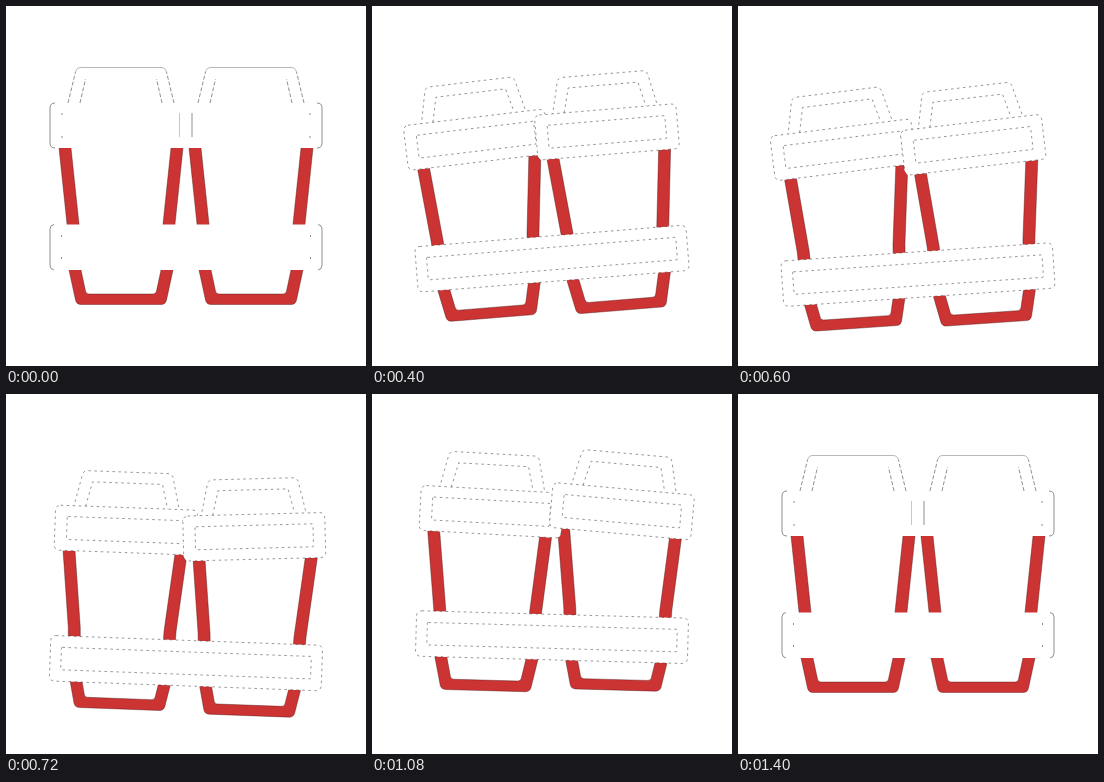
An HTML page that plays this animation: 360x360 px, repeating every 1.64 s.

```html
<!DOCTYPE html>
<html lang="en">
<head>
<meta charset="utf-8">
<title>Two cups in a carrier</title>
<style>
  html, body { margin: 0; width: 100%; height: 100%; overflow: hidden; background: #fff; }
  svg { display: block; width: 100vw; height: 100vh; }
  .white { fill: #fff; }
  .red { fill: #cc3333; fill-rule: evenodd; stroke: #4a1010; stroke-width: .4; }
  .edge { fill: none; stroke: #333; stroke-width: .5; stroke-dasharray: 2.5 3.5; }
  .still { fill: none; stroke: #444; stroke-width: .6; }
</style>
</head>
<body>
<svg viewBox="0 0 360 360">
  <defs>
    <path id="body" class="red" d="M-64.3 120L-54 218L-52 264L-45.5 294Q-44.5 298.5 -40 298.5H40Q44.5 298.5 45.5 294L52 264L54 218L64.3 120H52.3L42 218L40 264L35.5 285Q35 288 32 288H-32Q-35 288 -35.5 285L-40 264L-42 218L-52.3 120Z"/>
    <path id="dome" d="M-53 99L-45.5 66Q-44.5 61.5 -40 61.5H40Q44.5 61.5 45.5 66L53 99"/>
    <path id="domeIn" d="M-41 97L-35 72.5H35L41 97"/>
    <rect id="rim" x="-71" y="97" width="142" height="45" rx="5"/>
    <rect id="rimIn" x="-59" y="108" width="118" height="23" rx="1"/>
    <rect id="tray" x="44" y="218.5" width="272" height="45.5" rx="5"/>
    <g id="lidFill" class="white"><use href="#dome"/><use href="#rim"/></g>
    <g id="lidTilt">
      <use href="#dome" class="edge"/><use href="#domeIn" class="edge"/>
      <use href="#rim" class="white"/><use href="#rim" class="edge"/><use href="#rimIn" class="edge"/>
    </g>
    <g id="lidStill" class="still">
      <path d="M-45.5 66Q-44.5 61.5 -40 61.5H40Q44.5 61.5 45.5 66" stroke="#888"/>
      <path d="M-53 97L-45.5 66M53 97L45.5 66M-41 97L-35.5 73M41 97L35.5 73" stroke-dasharray="4 2"/>
      <path d="M66 97Q71 97 71 102V137Q71 142 66 142M-59 107V131M59 107V109M59 130V132"/>
    </g>
  </defs>
  <g id="all">
    <use id="leftBody" href="#body"/>
    <use id="rightBody" href="#body"/>
    <g id="leftLid">
      <use href="#lidFill"/>
      <use class="tilt" href="#lidTilt"/>
      <use class="rest" href="#lidStill" transform="scale(-1 1)"/>
    </g>
    <g id="rightLid">
      <use href="#lidFill"/>
      <use class="tilt" href="#lidTilt"/>
      <use class="rest" href="#lidStill"/>
    </g>
    <use href="#tray" class="white"/>
    <g class="tilt edge">
      <use href="#tray"/>
      <rect x="55" y="230" width="250" height="22.5" rx="1"/>
    </g>
    <path class="rest still" d="M48 218.5Q44 219 44 223V259Q44 263.5 48 264M312 218.5Q316 219 316 223V259Q316 263.5 312 264M55.5 229V231M55.5 251V253M304.5 229V231M304.5 251V253"/>
  </g>
</svg>
<script>
const LOOP = 1640, STEP = 40, START = 160, LAST = 31;
const SWING = 26;
const byId = id => document.getElementById(id);
const all = byId('all');
const cups = [
  { body: byId('leftBody'), lid: byId('leftLid'), x: 115, lag: 1 },
  { body: byId('rightBody'), lid: byId('rightLid'), x: 245, lag: 5 }
];

const clamp = (v, lo, hi) => Math.min(hi, Math.max(lo, v));
const sine = u => (1 - Math.cos(Math.PI * u)) / 2;
const snap = u => u < .5 ? (2 * u) ** 2.6 / 2 : 1 - (2 - 2 * u) ** 2.6 / 2;

// 0 -> -1 -> 1 -> 0 in equal thirds
function sway(k) {
  const u = clamp(k / SWING, 0, 1) * 3;
  if (u < 1) return -sine(u);
  if (u < 2) return 2 * sine(u - 1) - 1;
  return 1 - sine(u - 2);
}

// 0 -> 1 -> 0 in equal halves
const bump = (k, ease) => ease(1 - Math.abs(clamp(k / SWING, 0, 1) * 2 - 1));

const active = k => k > 0 && k < SWING;

function edges(part, moving) {
  for (const el of part.children) {
    if (el.classList.contains('tilt')) el.style.display = moving ? '' : 'none';
    if (el.classList.contains('rest')) el.style.display = moving ? 'none' : '';
  }
}

// The cup hops out of the tray while its lid rocks on top
function drawCup({ body, lid, x, lag }, k) {
  const hop = `translate(${x} ${-9 * bump(k - lag, sine)})`;
  body.setAttribute('transform', hop);
  lid.setAttribute('transform', `${hop} rotate(${3.6 * sway(k - lag)} 0 142)`);
  edges(lid, active(k) || active(k - lag));
}

function draw(ms) {
  const k = clamp(Math.floor((ms % LOOP - START) / STEP), 0, LAST);
  all.setAttribute('transform',
    `translate(0 ${28 * bump(k, snap)}) rotate(${5.9 * sway(k)} 180 241)`);
  edges(all, active(k));
  for (const cup of cups) drawCup(cup, k);
}

let t0;
function tick(now) {
  t0 ??= now;
  draw(Math.max(0, now - t0));
  requestAnimationFrame(tick);
}
draw(0);
requestAnimationFrame(tick);
</script>
</body>
</html>
```
